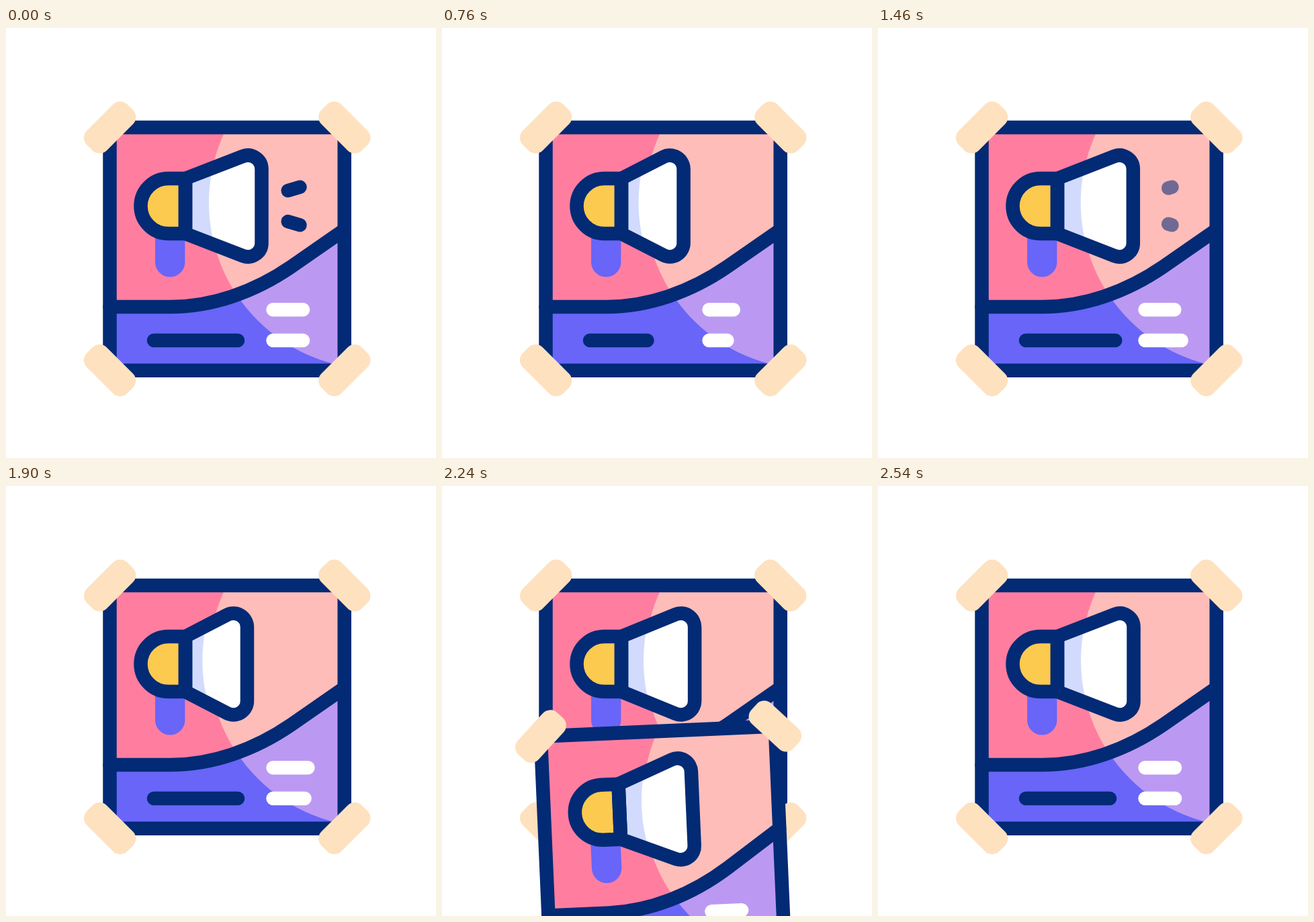
Recreate the animation shown at these times as an HTML page with a canvas. Size 640 px wide and 640 px high, loop 2620 ms.

```html
<!DOCTYPE html>
<html lang="en">
<head>
<meta charset="utf-8">
<title>Poster</title>
<style>
  html, body { margin: 0; width: 100%; height: 100%; overflow: hidden; background: #fff; }
  canvas { display: block; width: 640px; height: 640px; }
</style>
</head>
<body>
<canvas id="stage" width="640" height="640"></canvas>
<script>
const ctx = document.getElementById('stage').getContext('2d');
const LOOP = 2620, PULSE = 1120, STROKE = 20.5, AXIS = 265;
const MID = { x: 329.2, y: 328.8 };
const NAVY = '#032a75', PINK = '#ff7ea0', BLUSH = '#febdb9', BLUE = '#6865f8',
      LILAC = '#bb99f2', SHADE = '#d2dbfd', WHITE = '#fff', YELLOW = '#fdca50', TAPE = '#fee1bf';

// Eased 0..1 progress of a step that starts at `start` and lasts `span` ms
function ease(t, start, span) {
  const s = Math.min(1, Math.max(0, (t - start) / span));
  return s * s * (3 - 2 * s);
}

function fill(path, color) {
  ctx.fillStyle = color;
  ctx.fill(path);
}

function stroke(path, color = NAVY, cap = 'round') {
  ctx.strokeStyle = color;
  ctx.lineWidth = STROKE;
  ctx.lineCap = cap;
  ctx.stroke(path);
}

function clipped(path, draw) {
  ctx.save();
  ctx.clip(path);
  draw();
  ctx.restore();
}

function disc(dx = 0) {
  const p = new Path2D();
  p.arc(550 + dx, 260, 248, 0, Math.PI * 2);
  return p;
}

function line(x1, y1, x2, y2, color) {
  const p = new Path2D();
  p.moveTo(x1, y1);
  p.lineTo(x2, y2);
  stroke(p, color);
}

const panel = new Path2D('M154.5 148H503.7V509.7H154.5Z');
const wave = 'M154.5 415H245C306 415 369 393.5 425 355L503.5 300.5';
const curve = new Path2D(wave);
const ground = new Path2D(wave + 'V509.7H154.5Z');
const handle = new Path2D('M222 300H266.4V348.4A22.2 22.2 0 0 1 222 348.4Z');
const ball = new Path2D('M267 224H241.5A41 41 0 0 0 241.5 306H267Z');

// Bell whose rounded mouth sits dx away from its open pose
function bell(dx) {
  const r = 20.5, x = 267, y = 224, cx = 360 + dx, cy = 210;
  const d = Math.hypot(cx - x, cy - y);
  const a = Math.atan2(cy - y, cx - x) - Math.asin(r / d);
  const len = Math.sqrt(d * d - r * r);
  const tx = x + len * Math.cos(a), ty = y + len * Math.sin(a);
  const flip = v => 2 * AXIS - v;
  return new Path2D(`M${x} ${y}L${tx} ${ty}A${r} ${r} 0 0 1 ${cx + r} ${cy}` +
    `V${flip(cy)}A${r} ${r} 0 0 1 ${tx} ${flip(ty)}L${x} ${flip(y)}Z`);
}

function horn(t) {
  let open = 1;
  for (const at of [0, PULSE]) {
    open += ease(t, at + 920, 280) - ease(t, at + 280, 580);
  }
  const dx = 22.7 * (open - 1);
  const shape = bell(dx);
  fill(handle, BLUE);
  fill(ball, YELLOW);
  fill(shape, SHADE);
  clipped(shape, () => fill(disc(0.45 * dx), WHITE));
  stroke(ball);
  stroke(shape);
}

// Sound marks: shrink towards the far end while fading, then grow back
function marks(t) {
  const u = t < 1063 ? t : t - PULSE;
  const grow = u < 0 ? ease(u, -57, 120) : 1;
  const from = ease(u, 100, 380);
  const alpha = 1 - ease(u, 100, 530);
  if (grow <= 0 || alpha <= 0) return;
  const x = s => 419.7 + 17.8 * s, y = s => 23 + 5.3 * s;
  ctx.globalAlpha = alpha;
  for (const side of [-1, 1]) {
    line(x(from), AXIS + side * y(from), x(grow), AXIS + side * y(grow), NAVY);
  }
  ctx.globalAlpha = 1;
}

// Text bar: pulls in by `dip`, overshoots by 10, settles
function bar(t, x, y, length, color, start, dip) {
  const delta = -dip * ease(t, start, 600) +
    (dip + 10) * ease(t, start + 600, 600) - 10 * ease(t, start + 1200, 600);
  line(x, y, x + length + delta, y, color);
}

function tapes() {
  for (const sx of [-1, 1]) for (const sy of [-1, 1]) {
    ctx.save();
    ctx.translate(MID.x + sx * 174.6, MID.y + sy * 180.8);
    ctx.rotate(-sx * sy * Math.PI / 4);
    ctx.beginPath();
    ctx.roundRect(-42.5, -20.9, 85, 41.8, 15);
    ctx.fillStyle = TAPE;
    ctx.fill();
    ctx.restore();
  }
}

function poster(t) {
  fill(panel, PINK);
  clipped(panel, () => fill(disc(), BLUSH));
  fill(ground, BLUE);
  clipped(ground, () => fill(disc(), LILAC));
  stroke(curve);
  stroke(panel);
  horn(t);
  marks(t);
  bar(t, 220, 465, 125, NAVY, 100, 41);
  bar(t, 397.5, 465, 44.5, WHITE, 300, 20.4);
  bar(t, 397.5, 419.3, 44.5, WHITE, 500, 20.4);
  tapes();
}

function frame(now) {
  const t = now % LOOP;
  const fall = ease(t, 2000, 600);
  ctx.fillStyle = WHITE;
  ctx.fillRect(0, 0, 640, 640);
  poster(t);
  if (fall > 0) {
    ctx.save();
    ctx.translate(MID.x, MID.y + 612 * fall);
    ctx.rotate(-7 * fall * Math.PI / 180);
    ctx.translate(-MID.x, -MID.y);
    poster(t);
    ctx.restore();
  }
}

const begin = performance.now();
function tick() {
  frame(performance.now() - begin);
  requestAnimationFrame(tick);
}
tick();
</script>
</body>
</html>
```
